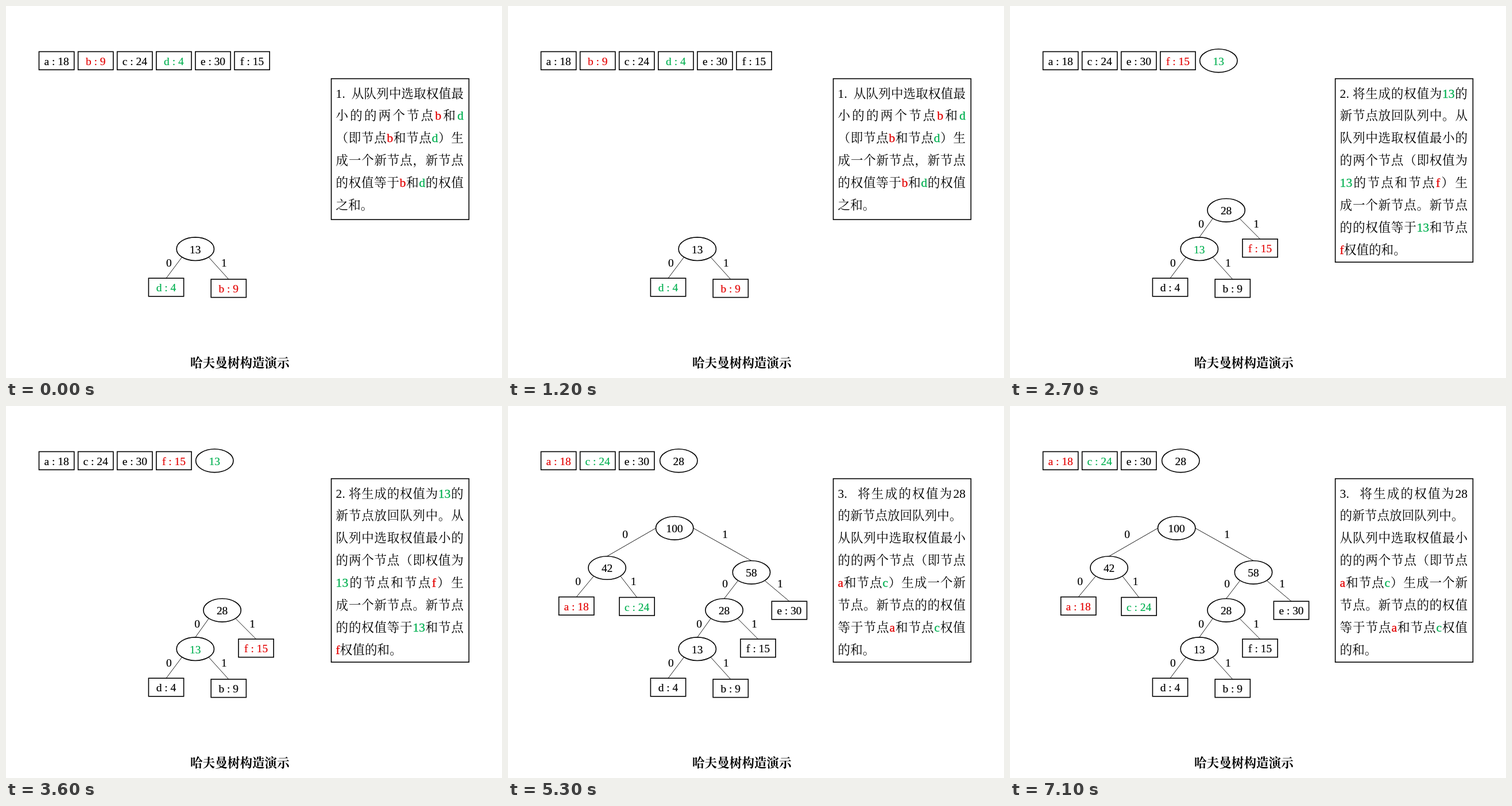
An HTML page that plays this animation: 864 px wide and 648 px high, repeating every 8 s.

```html
<!DOCTYPE html>
<html lang="zh-CN">
<head>
<meta charset="utf-8">
<title>哈夫曼树构造演示</title>
<style>
  html, body { margin: 0; width: 100%; height: 100%; overflow: hidden; background: #fff; }
  body, svg text { font-family: "Liberation Serif", "Noto Serif CJK SC", "Noto Sans CJK SC", serif; }
  svg { position: absolute; left: 0; top: 0; }
  svg text { font-size: 19.44px; text-anchor: middle; stroke: currentColor; stroke-width: 0.2; }
  svg .title { font-size: 21.6px; font-weight: 600; stroke: none; }
  .shape { fill: #fff; stroke: #000; stroke-width: 1.6; }
  .edge { stroke: #000; stroke-width: 0.9; }
  #note {
    position: absolute; left: 574.6px; top: 133.6px; width: 222.4px;
    font-size: 21.6px; line-height: 38.88px;
    text-spacing-trim: space-all; text-autospace: no-autospace;
  }
  #note div { height: 38.88px; white-space: nowrap; text-align: justify; text-align-last: justify; }
  #note .end { text-align-last: left; }
  #note span { -webkit-text-stroke: 0.3px; }
</style>
</head>
<body>
<svg id="stage" width="864" height="648" viewBox="0 0 864 648"></svg>
<div id="note"></div>
<script>
const LOOP = 8000;
const RED = '#e30000', GREEN = '#00b050';
const stage = document.getElementById('stage');
const note = document.getElementById('note');

// Tree nodes: label, centre, and for inner nodes the two children with
// the positions of the 0 and 1 marks relative to the centre.
const nodes = {
  d: { text: 'd : 4', x: 279, y: 490 },
  b: { text: 'b : 9', x: 387.8, y: 491.8 },
  f: { text: 'f : 15', x: 435.6, y: 421.8 },
  e: { text: 'e : 30', x: 490, y: 356 },
  a: { text: 'a : 18', x: 119.2, y: 348.4 },
  c: { text: 'c : 24', x: 224.6, y: 349.2 },
  13: { text: '13', x: 329.8, y: 423.2, kids: ['d', 'b'], marks: [-46, 50, 23.5] },
  28: { text: '28', x: 376.6, y: 355.8, kids: ['13', 'f'], marks: [-43.6, 52.4, 22.8] },
  42: { text: '42', x: 172.6, y: 282, kids: ['a', 'c'], marks: [-50.4, 46, 23.2] },
  58: { text: '58', x: 424, y: 289.8, kids: ['28', 'e'], marks: [-46, 50, 19.2] },
  100: { text: '100', x: 290.2, y: 212.8, kids: ['42', '58'], marks: [-86, 88, 9.8], wide: true }
};

// In notes, {x} is red and [x] is green. "gap" is the extra space
// before a merged node in the queue.
const scenes = [
  { start: 0, queue: 'abcdef'.split(''), gap: 0, root: '13', red: 'b', green: 'd', boxHeight: 245.4, lines: [
    '1.\u00a0\u00a0从队列中选取权值最', '小的的两个节点{b}和[d]', '（即节点{b}和节点[d]）生',
    '成一个新节点，新节点', '的权值等于{b}和[d]的权值', '之和。'] },
  { start: 2700, queue: ['a', 'c', 'e', 'f', '13'], gap: 2.8, root: '28', red: 'f', green: '13', boxHeight: 319.6, lines: [
    '2.\u00a0将生成的权值为[13]的', '新节点放回队列中。从', '队列中选取权值最小的', '的两个节点（即权值为',
    '[13]的节点和节点{f}）生', '成一个新节点。新节点', '的的权值等于[13]和节点', '{f}权值的和。'] },
  { start: 5300, queue: ['a', 'c', 'e', '28'], gap: 4.9, root: '100', red: 'a', green: 'c', boxHeight: 319.6, lines: [
    '3.\u2002\u00a0将生成的权值为28', '的新节点放回队列中。', '从队列中选取权值最小', '的的两个节点（即节点',
    '{a}和节点[c]）生成一个新', '节点。新节点的的权值', '等于节点{a}和节点[c]权值', '的和。'] }
];

const label = (x, y, text, color = '#000', cls = '') =>
  `<text x="${x}" y="${y}" fill="${color}" color="${color}" class="${cls}">${text}</text>`;
const box = (x, y, w, h) =>
  `<rect class="shape" x="${x}" y="${y}" width="${w}" height="${h}"/>`;
const edge = (x1, y1, x2, y2) =>
  `<line class="edge" x1="${x1}" y1="${y1}" x2="${x2}" y2="${y2}"/>`;

function drawNode(id, x, y, scene) {
  const color = id === scene.red ? RED : id === scene.green ? GREEN : '#000';
  const shape = nodes[id].kids
    ? `<ellipse class="shape" cx="${x}" cy="${y}" rx="32.7" ry="20.3"/>`
    : box(x - 30.6, y - 15.8, 61.2, 31.6);
  return shape + label(x, y + 7.3, nodes[id].text, color);
}

function drawTree(id, scene) {
  const { x, y, kids, marks, wide } = nodes[id];
  let out = '';
  if (kids) {
    kids.forEach((kid, i) => {
      const side = i ? 1 : -1;
      const child = nodes[kid];
      const top = child.y - (child.kids ? 20.3 : 15.8);
      out += edge(x + side * (wide ? 32.7 : 23.5), y + (wide ? 0 : 14.6), child.x, top);
      out += label(x + marks[i], y + marks[2] + 6.9, i);
      out += drawTree(kid, scene);
    });
  }
  return out + drawNode(id, x, y, scene);
}

function drawQueue(scene) {
  return scene.queue.map((id, i) => {
    const shift = nodes[id].kids ? scene.gap : 0;
    return drawNode(id, 88.1 + 68.1 * i + shift, 95.3, scene);
  }).join('');
}

const paint = line => line
  .replace(/\{(.+?)\}/g, `<span style="color:${RED}">$1</span>`)
  .replace(/\[(.+?)\]/g, `<span style="color:${GREEN}">$1</span>`);

const noteLine = line =>
  `<div class="${line.endsWith('。') ? 'end' : ''}">${paint(line)}</div>`;

function show(scene) {
  stage.innerHTML = drawQueue(scene) + drawTree(scene.root, scene) +
    box(566.6, 126.6, 239.8, scene.boxHeight) +
    label(407.4, 629, '哈夫曼树构造演示', '#000', 'title');
  note.innerHTML = scene.lines.map(noteLine).join('');
}

let current = null;
const origin = performance.now();

function tick() {
  const t = (performance.now() - origin) % LOOP;
  const scene = scenes.filter(s => s.start <= t).pop();
  if (scene !== current) show(current = scene);
  requestAnimationFrame(tick);
}
tick();
</script>
</body>
</html>
```
